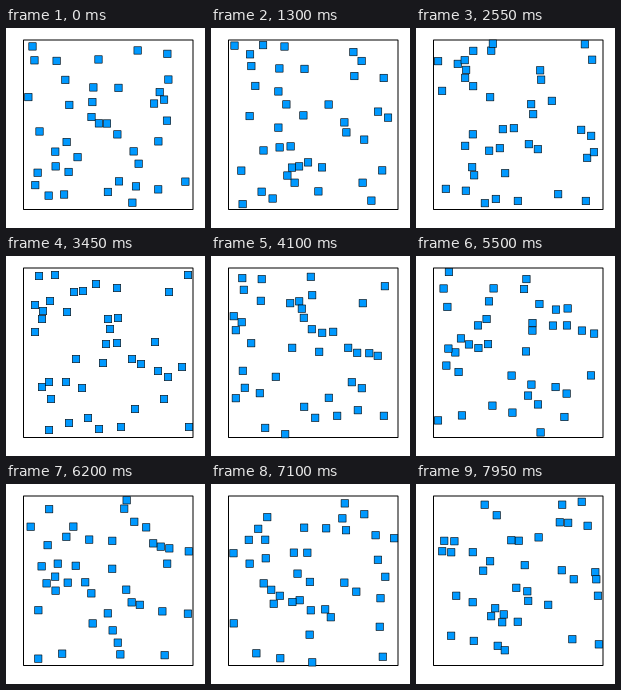
These frames come from a looping animation (199 px wide and 200 px high, 8000 ms). A matplotlib script:

```python
import math

import numpy as np
import matplotlib.pyplot as plt
from matplotlib.animation import FuncAnimation
from matplotlib.collections import PolyCollection
from matplotlib.patches import Rectangle

W, H, DPI = 199, 200, 100
PX = 72 / DPI
FRAMES, INTERVAL = 160, 50
SIZE, REACH = 7.4, 6.6            # drawn edge, contact distance
LOW = np.array([21.0, 15.5])      # limits for particle centres
HIGH = np.array([183.5, 178.5])
MID = 69                          # frame at which the start points hold
SPEED, SURGE = 0.73, 3.5          # pixels per frame, extra push after MID

# One start point per particle, grouped by diagonal heading.
START = {
    (1, 1): [(68, 36), (77, 35), (90, 28), (182, 19), (29, 76), (149, 86),
             (63, 167), (43, 174)],
    (1, -1): [(33, 20), (100, 88), (111, 87), (97, 107), (70, 103),
              (126, 103), (135, 108), (82, 162), (93, 173), (115, 171),
              (183, 171)],
    (-1, 1): [(163, 36), (29, 49), (37, 55), (36, 63), (112, 62), (152, 115),
              (162, 121), (36, 131), (60, 126), (158, 143)],
    (-1, -1): [(49, 19), (111, 32), (44, 45), (61, 56), (102, 63),
               (104, 73), (176, 111), (43, 126), (76, 132), (45, 143),
               (129, 153)],
}
start = np.array([p for group in START.values() for p in group], float)
heading = np.array([d for d, group in START.items() for _ in group], float)


def collide(pos, vel):
    """Reflect at the walls and swap speeds of touching squares."""
    speed = np.abs(vel)
    vel[:] = np.where(pos < LOW, speed, np.where(pos > HIGH, -speed, vel))
    gaps = np.abs(pos[:, None] - pos[None]).max(axis=2)
    for i, j in np.argwhere(np.triu(gaps < REACH, 1)):
        delta = pos[i] - pos[j]
        axis = np.argmax(np.abs(delta))
        if delta[axis] * (vel[i, axis] - vel[j, axis]) < 0:
            vel[[i, j], axis] = vel[[j, i], axis]


def run(vel, stops, step=0.05):
    """Positions after each of the rising distances in stops."""
    pos, vel = start.copy(), vel.copy()
    track = []
    for gap in np.diff(stops, prepend=0):
        n = math.ceil(gap / step)
        for _ in range(n):
            pos += vel * gap / n
            collide(pos, vel)
        track.append(pos.copy())
    return track


# The motion is reversible, so it is traced both ways from the middle.
time = np.arange(FRAMES) - MID
travel = SPEED * time + SURGE * np.clip(time / 27, 0, 1)
before = run(-heading, -travel[MID::-1])
after = run(heading, travel[MID:])
track = before[:0:-1] + after

fig = plt.figure(figsize=(W / DPI, H / DPI), dpi=DPI, facecolor="white")
ax = fig.add_axes([0, 0, 1, 1])
ax.set(xlim=(0, W), ylim=(H, 0))
ax.axis("off")
ax.add_patch(Rectangle((17.5, 12), 169.5, 169.5, fill=False, snap=False,
                       edgecolor="black", linewidth=PX))

corners = SIZE / 2 * np.array([(-1, -1), (1, -1), (1, 1), (-1, 1)])
squares = PolyCollection([], facecolor="#0099ff", edgecolor="black",
                         linewidth=0.6 * PX, snap=False, zorder=3)
ax.add_collection(squares, autolim=False)


def draw(frame):
    squares.set_verts(track[frame][:, None] + corners)
    return squares,


anim = FuncAnimation(fig, draw, frames=FRAMES, interval=INTERVAL,
                     repeat=True, repeat_delay=0, blit=False)
plt.show()
```
